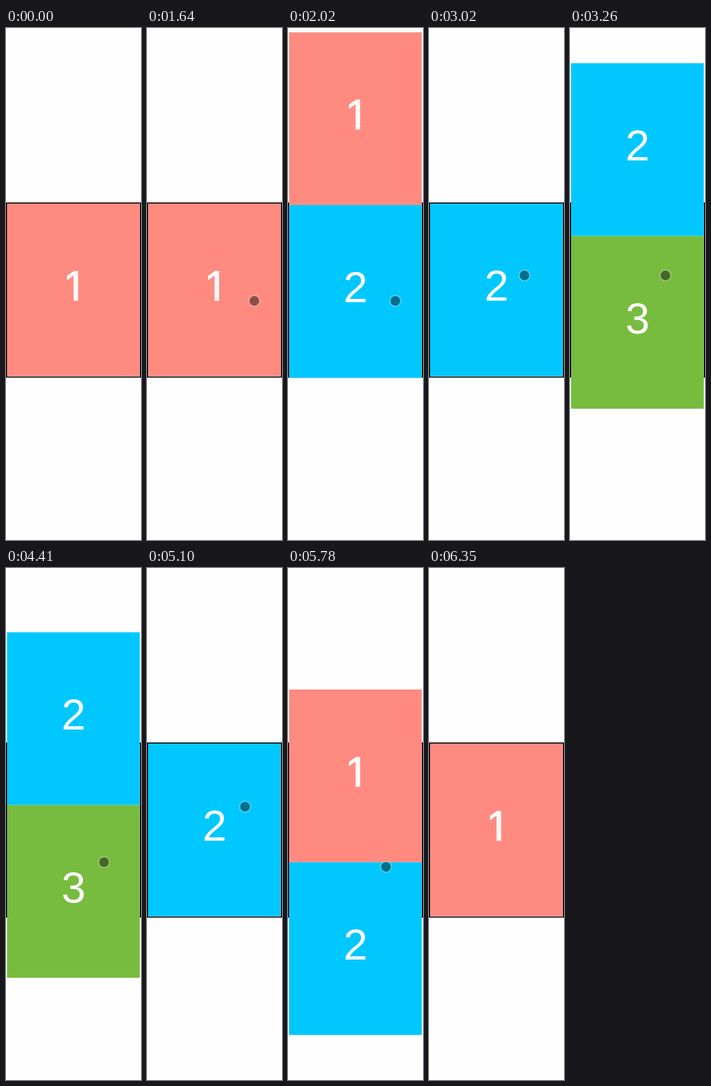
Write an HTML page that moves like this. It is 261 by 986 pixels and loops after 7.38 s.

```html
<!DOCTYPE html>
<html lang="en">
<head>
<meta charset="utf-8">
<title>Vertical pager</title>
<style>
  html, body { margin: 0; width: 100%; height: 100%; overflow: hidden; background: #fefefe; }
  svg { display: block; width: 261px; height: 986px; }
  text { font: 84px "Liberation Sans", Arial, sans-serif; fill: #fff; text-anchor: middle; }
  /* a figure one without its foot */
  .plain { font-size: 82px; stroke: #fff; stroke-width: 1.5px; opacity: .95; clip-path: url(#footless); }
</style>
</head>
<body>
<svg viewBox="0 0 261 986">
  <clipPath id="footless"><path d="M0 0H257V180H137.4V187.5H128.7V180H0Z"/></clipPath>
  <rect x="1" y="337" width="259" height="335.3" fill="none" stroke="#000" stroke-width="2"/>
  <g transform="translate(2 338)"><g id="strip"></g></g>
  <circle id="pointer" r="10.2" fill="#000" fill-opacity=".44" stroke="#fff" stroke-opacity=".5" stroke-width="1.5"/>
</svg>
<script>
const LOOP = 7380, PAGE = 332.7, SWIPE = 300;
const COLORS = ['#ff8a80', '#00c8ff', '#77bc3f'];

const outside = { x: 274, y: 632 };
const gestures = [
  { start: 850, end: 1100, x: 202, y: 637 },
  { start: 1360, end: 1640, x: 207.5, y: 525.5 },
  { start: 2270, end: 2460, x: 199, y: 613.5 },
  { start: 2770, end: 3020, x: 184.5, y: 476.5 },
  { start: 3590, end: 3860, x: 184.5, y: 455.5 },
  { start: 3980, end: 4180, x: 189.5, y: 566.5 },
  { start: 4780, end: 5100, x: 189.5, y: 459.5 },
  { start: 5230, end: 5470, x: 189.5, y: 575.5 },
  { start: 6190, end: 6350, x: 274, y: 582 }
];

const swipes = [
  { start: 1758, from: 0, to: 1 },
  { start: 3108, from: 1, to: 2 },
  { start: 4343, from: 2, to: 1 },
  { start: 5660, from: 1, to: 0 }
];

const place = ({ x, y }) => ({ transform: `translate(${x}px, ${y}px)` });
const pageOffset = page => place({ x: 0, y: -PAGE * page });
const visible = flag => ({ opacity: flag ? 1 : 0 });
const key = (time, style, easing = 'step-end') => ({ offset: time / LOOP, easing, ...style });

function play(element, keys, last) {
  element.animate([...keys, key(LOOP, last)], { duration: LOOP, iterations: Infinity });
}

function addPage(color, index) {
  const top = index * PAGE;
  const className = index === 0 ? 'plain' : '';
  const strip = document.getElementById('strip');
  strip.insertAdjacentHTML('beforeend', `<g>
    <rect y="${top}" width="256.7" height="${PAGE}" fill="${color}"/>
    <text class="${className}" x="${index === 0 ? 131.6 : 128.5}" y="${top + 187.2}">${index + 1}</text>
  </g>`);
  return strip.lastElementChild;
}

// Only the two pages of a swipe show while it runs.
COLORS.map(addPage).forEach((page, index) => {
  const keys = [key(0, visible(index === 0))];
  for (const { start, from, to } of swipes) {
    keys.push(
      key(start, visible(index === from || index === to)),
      key(start + SWIPE, visible(index === to))
    );
  }
  play(page, keys, visible(index === 0));
});

const stripKeys = [key(0, pageOffset(0))];
for (const { start, from, to } of swipes) {
  stripKeys.push(key(start, pageOffset(from), 'ease'), key(start + SWIPE, pageOffset(to)));
}
play(document.getElementById('strip'), stripKeys, pageOffset(0));

let spot = outside;
const pointerKeys = [key(0, place(spot))];
for (const gesture of gestures) {
  pointerKeys.push(key(gesture.start, place(spot), 'ease'), key(gesture.end, place(gesture)));
  spot = gesture;
}
play(document.getElementById('pointer'), pointerKeys, place(spot));
</script>
</body>
</html>
```
